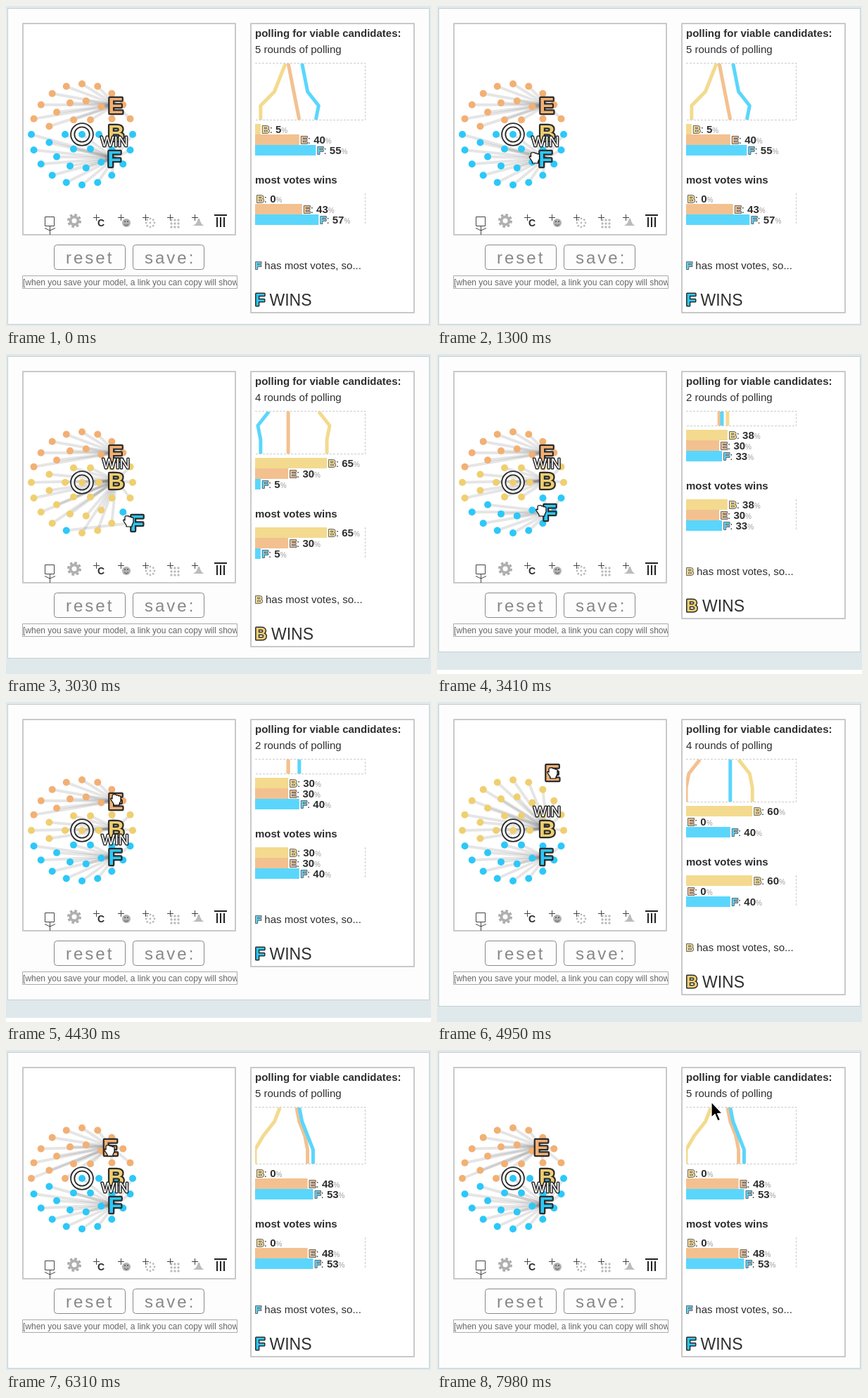
Animation of 604 by 456 pixels, one loop 8000 ms. Source, as an HTML page with a canvas:

```html
<!DOCTYPE html>
<html lang="en">
<head>
<meta charset="utf-8">
<title>Polling and plurality voting</title>
<style>
html, body { margin: 0; width: 100%; height: 100%; overflow: hidden; background: #fff; }
canvas { display: block; }
</style>
</head>
<body>
<canvas id="stage" width="604" height="456"></canvas>
<script>
const ctx = document.getElementById('stage').getContext('2d');
const LOOP = 8000, SANS = '"Liberation Sans", Arial, sans-serif';
const INK = '#2e2e2e', PX_PER_PERCENT = 1.57, LEFT = 354;
const NAMES = ['B', 'E', 'F'];
const BAR = { B: '#f3da8e', E: '#f3c190', F: '#5ad6fd' };
const DOT = { B: '#efcf70', E: '#f2b074', F: '#2cc8f8' };

// Voters: one in the middle, then rings of 6, 13 and 20.
const voters = [[108, 183]];
for (const [count, radius] of [[6, 24], [13, 48], [20, 72]])
  for (let i = 0; i < count; i++) {
    const a = 2 * Math.PI * i / count;
    voters.push([108 + radius * Math.cos(a), 183 + radius * Math.sin(a)]);
  }

// Election states: viable candidates, loyal F voters, poll history in percent.
// Without a history, the polls simply repeat the vote.
const fWins = { viable: 'EF', polls: { B: [27.5, 22.5, 17.5, 5, 5], E: [30, 32.5, 35, 37.5, 40], F: [42.5, 45, 47.5, 57.5, 55] } };
const honest = { viable: 'BEF' };
const fFades = { viable: 'BE', loyal: [10, 11, 22, 26], polls: { B: [47.5, 55, 65, 60, 65], E: [30, 30, 30, 30, 30], F: [22.5, 15, 5, 10, 5] } };
const fFar = { viable: 'BE', loyal: [22, 26], polls: { B: [57.5, 67.5, 65, 65], E: [30, 30, 30, 30], F: [12.5, 2.5, 5, 5] } };
const eFar = { viable: 'BF', polls: { B: [47.5, 57.5, 60, 60], E: [12.5, 2.5, 0, 0], F: [40, 40, 40, 40] } };
const bFades = { viable: 'EF', polls: { B: [22.5, 17.5, 7.5, 0, 0], E: [37.5, 40, 45, 47.5, 47.5], F: [40, 42.5, 47.5, 52.5, 52.5] } };
const schedule = [[0, fWins], [1670, honest], [1790, fFades], [2030, fFar], [3150, fFades],
  [3400, honest], [4710, eFar], [5700, bFades]];

// Stepped moves: [first step, last step, steps, x, y].
const tracks = {
  E: { from: [156, 141], moves: [[4710, 4950, 3, 164, 100], [5070, 5190, 2, 166, 92], [5340, 5940, 6, 148.5, 138]] },
  F: { from: [154, 217], moves: [[1670, 1910, 3, 172, 241], [2030, 2150, 2, 188, 247], [2910, 3030, 2, 186, 240],
    [3150, 3410, 3, 160, 225], [3530, 3680, 2, 155, 220.5]] },
  cursor: { from: [31, 441], moves: [[430, 1040, 6, 154, 203], [1160, 1160, 1, 135, 215], [1300, 1420, 2, 142, 215],
    [1670, 1910, 3, 166, 243], [2030, 2150, 2, 176, 244], [2910, 3030, 2, 174, 237], [3150, 3410, 3, 148, 222],
    [3530, 3680, 2, 143, 218], [4070, 4430, 4, 156, 138], [4710, 4950, 3, 164, 100], [5070, 5190, 2, 166, 92],
    [5340, 5940, 6, 148, 141], [6310, 6310, 1, 147, 142], [6430, 6550, 2, 214, 145], [6690, 6690, 1, 217, 145],
    [7080, 7080, 1, 217, 146], [7360, 7360, 1, 266, 127], [7500, 7980, 5, 390, 74]] }
};

function positionAt({ from, moves }, t) {
  let [x, y] = from;
  for (const [start, end, steps, toX, toY] of moves) {
    if (t < start) break;
    const gap = (end - start) / (steps - 1) || 1;
    const part = Math.min(steps, Math.floor((t - start) / gap) + 1) / steps;
    x += (toX - x) * part;
    y += (toY - y) * part;
  }
  return [x, y];
}

function rect(x, y, w, h, fill, stroke, width = 1) {
  if (fill) { ctx.fillStyle = fill; ctx.fillRect(x, y, w, h); }
  if (stroke) { ctx.strokeStyle = stroke; ctx.lineWidth = width; ctx.strokeRect(x, y, w, h); }
}
function line(points, color, width) {
  ctx.beginPath();
  points.forEach(p => ctx.lineTo(...p));
  ctx.strokeStyle = color;
  ctx.lineWidth = width;
  ctx.stroke();
}
function circle(x, y, r, fill, stroke, width) {
  ctx.beginPath();
  ctx.arc(x, y, r, 0, 7);
  if (fill) { ctx.fillStyle = fill; ctx.fill(); }
  if (stroke) { ctx.strokeStyle = stroke; ctx.lineWidth = width; ctx.stroke(); }
}
// Draws text and returns the x where it ends.
function text(s, x, y, size, color = INK, weight = '') {
  ctx.font = `${weight} ${size}px ${SANS}`;
  ctx.fillStyle = color;
  ctx.fillText(s, x, y);
  return x + ctx.measureText(s).width;
}
function outlined(s, x, y, size, color, outline, weight = 'bold') {
  ctx.font = `${weight} ${size}px ${SANS}`;
  ctx.strokeStyle = size > 18 ? '#2b2b2b' : '#666';
  ctx.lineWidth = outline;
  ctx.strokeText(s, x, y);
  return text(s, x, y, size, color, weight);
}

function drawTools() {
  rect(55.5, 300.5, 13, 13, null, '#444');
  line([[62.5, 314], [62.5, 326]], '#444', 1);
  line([[55, 316.5], [62.5, 320], [70, 316.5]], '#444', 1);
  ctx.setLineDash([3.5, 3.2]);
  circle(97, 306, 8.5, null, '#aaa', 3);
  ctx.setLineDash([]);
  circle(97, 306, 5.5, null, '#b0b0b0', 4);
  for (const x of [128, 163, 198, 233, 268]) {
    line([[x - 4, 301.5], [x + 5, 301.5]], '#444', 1);
    line([[x + .5, 297], [x + .5, 306]], '#444', 1);
  }
  text('C', 130, 314, 14, INK, 'bold');
  circle(171, 309, 6, '#b0b0b0');
  line([[168, 311], [171, 313], [174, 311]], '#555', 1);
  circle(169, 307, 1, '#555');
  circle(173, 307, 1, '#555');
  circle(205, 309, 1.4, '#bbb');
  for (let i = 0; i < 8; i++) circle(205 + 6 * Math.cos(i * Math.PI / 4), 309 + 6 * Math.sin(i * Math.PI / 4), 1.4, '#bbb');
  for (let i = 0; i < 9; i++) circle(235 + i % 3 * 5, 305 + Math.floor(i / 3) * 5, 1.7, '#bbb');
  ctx.fillStyle = '#bbb';
  ctx.fill(new Path2D('M265 313 Q271 312 273 303 H275 Q277 312 282 313z'));
  line([[296, 298], [314, 298]], '#222', 2);
  for (const x of [300, 305, 310]) line([[x, 301], [x, 315]], '#222', 2);
}

function drawButton(label, x) {
  ctx.beginPath();
  ctx.roundRect(x + .5, 340.5, 101, 35, 4);
  ctx.strokeStyle = '#888';
  ctx.lineWidth = 1;
  ctx.stroke();
  ctx.letterSpacing = '3px';
  text(label, x + 17, 367, 24, '#888');
  ctx.letterSpacing = '0px';
}

function drawLeft(spots, votes, winner) {
  rect(24, 25, 302, 301, '#fff', '#c9c9c9', 2);
  voters.forEach((v, i) => line([v, spots[votes[i]]], 'rgba(0,0,0,.1)', 4));
  voters.forEach((v, i) => circle(...v, 5, DOT[votes[i]]));
  circle(108, 183, 13.3, null, '#2b2b2b', 7);
  circle(108, 183, 13.3, null, '#fff', 3.4);
  drawTools();
  ctx.textAlign = 'center';
  for (const n of ['F', 'E', 'B']) outlined(n, spots[n][0], spots[n][1] + 11.5, 32, DOT[n], 4.5);
  const [x, y] = spots[winner];
  outlined('WIN', x, y - 17.5, 20, '#fff', 3, '');
  ctx.textAlign = 'left';

  drawButton('reset', 68);
  drawButton('save:', 180);
  ctx.save();
  ctx.beginPath();
  ctx.rect(24, 384, 304.5, 19);
  ctx.clip();
  text('[when you save your model, a link you can copy will show up here]', 24, 398, 12, '#666');
  ctx.restore();
  rect(23.5, 384.5, 305, 18, null, '#aaa');
}

function drawBars(percents, top) {
  NAMES.forEach((n, i) => {
    const width = percents[n] * PX_PER_PERCENT, y = top + 15 * i;
    rect(LEFT, y, width, 15, BAR[n]);
    let x = outlined(n, LEFT + width + 2, y + 13, 15, BAR[n], 2);
    x = text(': ', x, y + 13, 15);
    x = text(Math.round(percents[n]), x, y + 13, 15, INK, 'bold');
    text('%', x, y + 13, 10, '#999');
  });
}

function drawPanel(polls, shares, winner, bottom) {
  const rounds = polls.B.length, graphEnd = 82 + 20 * (rounds - 1);
  rect(348, 25, 232, bottom - 25, '#fff', '#c9c9c9', 2);
  text('polling for viable candidates:', LEFT, 44, 15, INK, 'bold');
  text(rounds + ' rounds of polling', LEFT, 67, 15);

  ctx.setLineDash([3, 2]);
  line([[LEFT, 81.5], [510.5, 81.5], [510.5, graphEnd + .5], [LEFT, graphEnd + .5]], '#ccc', 1);
  line([[510.5, graphEnd + 105], [510.5, graphEnd + 150]], '#ccc', 1);
  ctx.setLineDash([]);
  ctx.save();
  ctx.beginPath();
  ctx.rect(LEFT, 82, 156, graphEnd - 82);
  ctx.clip();
  for (const n of NAMES) line(polls[n].map((p, i) => [LEFT + p * PX_PER_PERCENT, 82 + 20 * i]), BAR[n], 5);
  ctx.restore();

  const last = {};
  for (const n of NAMES) last[n] = polls[n][rounds - 1];
  drawBars(last, graphEnd + 6);
  text('most votes wins', LEFT, graphEnd + 91, 15, INK, 'bold');
  drawBars(shares, graphEnd + 105);
  text(' has most votes, so...', outlined(winner, LEFT, graphEnd + 213, 15, BAR[winner], 2), graphEnd + 213, 15);
  text(' WINS', outlined(winner, LEFT, graphEnd + 265, 23, DOT[winner], 3), graphEnd + 265, 23);
}

const ARROW = new Path2D('M0 0V22L5 17.5L9 27L12.5 25.5L8.5 16.5L15 16z');
const HAND = new Path2D('M-5 0q-3-2-2 1l4 6v2h8v-2l2-4v-6q-1-2-3-1q-1-2-3-1q-1-2-3-1q-3-1-3 2z');

function drawCursor(t) {
  if (t < 290) return;
  const arrow = t < 1160 || t >= 6430;
  ctx.save();
  ctx.translate(...positionAt(tracks.cursor, t));
  ctx.fillStyle = arrow ? '#000' : '#fff';
  ctx.strokeStyle = arrow ? '#fff' : '#000';
  ctx.lineWidth = 1.2;
  ctx.fill(arrow ? ARROW : HAND);
  ctx.stroke(arrow ? ARROW : HAND);
  ctx.restore();
}

function castVotes(spots, { viable, loyal = [] }) {
  return voters.map(([x, y], i) => {
    if (loyal.includes(i)) return 'F';
    const distance = n => Math.hypot(spots[n][0] - x, spots[n][1] - y);
    return [...viable].reduce((a, b) => distance(b) < distance(a) ? b : a);
  });
}

function draw(t) {
  const state = schedule.findLast(([start]) => t >= start)[1];
  const spots = { B: [156.5, 180], E: positionAt(tracks.E, t), F: positionAt(tracks.F, t) };
  const votes = castVotes(spots, state);
  const shares = {}, steady = {};
  for (const n of NAMES) {
    shares[n] = votes.filter(v => v === n).length / voters.length * 100;
    steady[n] = [shares[n], shares[n]];
  }
  const polls = state.polls || steady;
  const winner = NAMES.reduce((a, b) => shares[b] > shares[a] ? b : a);
  const panelBottom = 337 + 20 * polls.B.length;
  const cardBottom = Math.max(424, panelBottom + 16);

  rect(0, 0, 604, 456, '#fff');
  rect(0, 0, 604, cardBottom + 26, '#dfe9eb');
  rect(2.5, 3.5, 599, cardBottom - 3, '#fdfdfd', '#c8cfd1');
  drawLeft(spots, votes, winner);
  drawPanel(polls, shares, winner, panelBottom);
  drawCursor(t);
}

ctx.lineJoin = 'round';
function frame() {
  draw(performance.now() % LOOP);
  requestAnimationFrame(frame);
}
frame();
</script>
</body>
</html>
```
